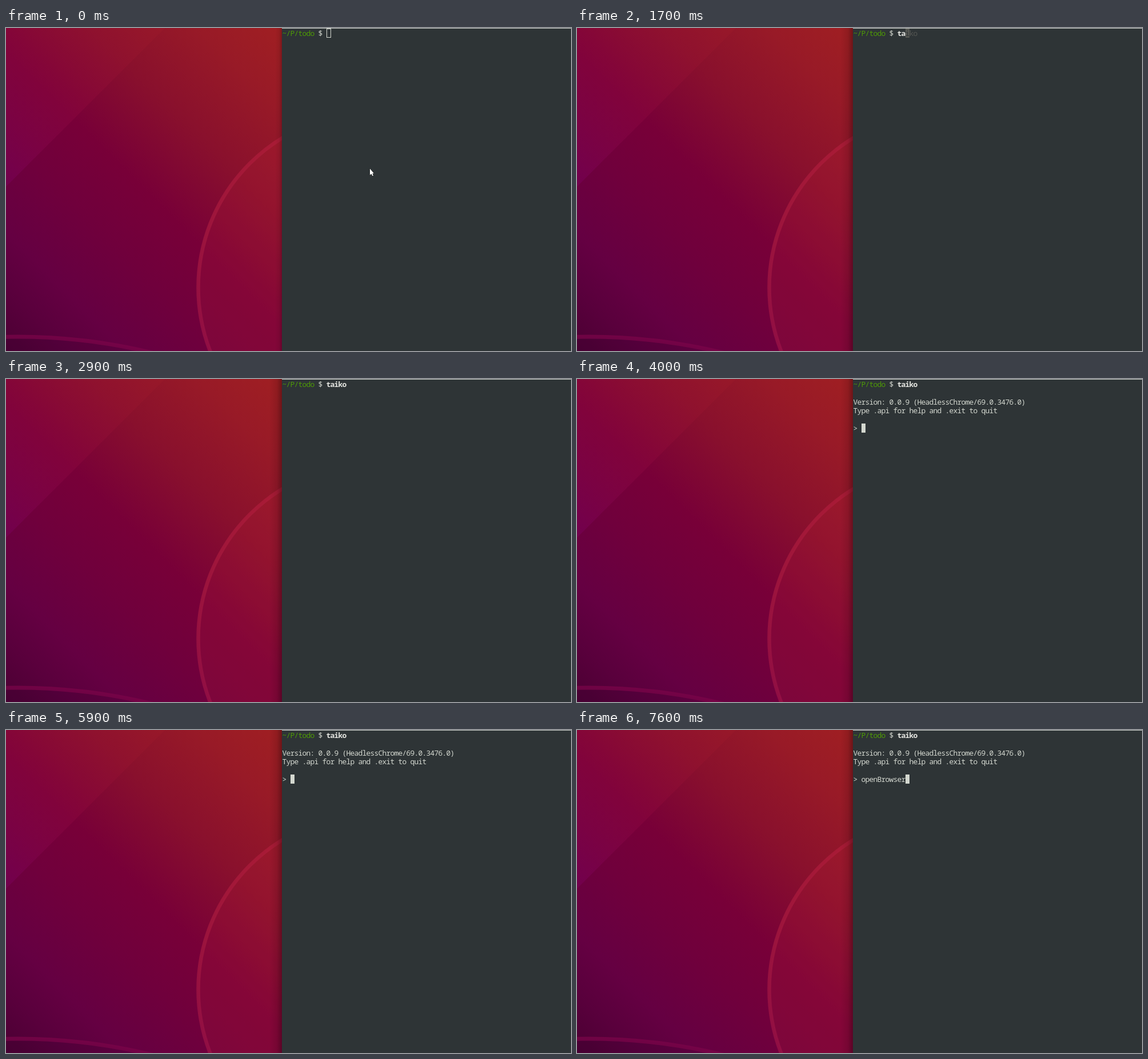
Animation, 989 px wide and 566 px high, one loop 8000 ms. Source, as an HTML page:

```html
<!DOCTYPE html>
<html lang="en">
<head>
<meta charset="utf-8">
<title>Terminal session</title>
<style>
  html, body { margin: 0; width: 100%; height: 100%; overflow: hidden; background: #2e3436; }
  svg { display: block; width: 989px; height: 566px; }
  text {
    font: 13px "Noto Sans Mono", "DejaVu Sans Mono", monospace;
    letter-spacing: -0.8px;
    white-space: pre;
    fill: #d3d7cf;
  }
  .path { fill: #4e9a06; }
  .cmd { font-weight: 700; fill: #e6e7e2; }
  .hint { fill: #555753; }
  .under { fill: #2e3436; }
</style>
</head>
<body>
<svg viewBox="0 0 989 566" xmlns="http://www.w3.org/2000/svg">
  <defs>
    <linearGradient id="wall" gradientUnits="userSpaceOnUse" x1="483" y1="0" x2="-41.5" y2="524.5">
      <stop offset="0" stop-color="#a01f22"/>
      <stop offset=".14" stop-color="#981a27"/>
      <stop offset=".32" stop-color="#89102d"/>
      <stop offset=".5" stop-color="#780038"/>
      <stop offset=".64" stop-color="#70003c"/>
      <stop offset=".8" stop-color="#650042"/>
      <stop offset=".9" stop-color="#59003c"/>
      <stop offset="1" stop-color="#4b0033"/>
    </linearGradient>
    <linearGradient id="fold" gradientUnits="userSpaceOnUse" x1="278" y1="0" x2="0" y2="278">
      <stop offset="0" stop-color="#a81e28" stop-opacity=".2"/>
      <stop offset=".5" stop-color="#9c0c40" stop-opacity=".26"/>
      <stop offset="1" stop-color="#78005c" stop-opacity=".5"/>
    </linearGradient>
    <linearGradient id="ring" gradientUnits="userSpaceOnUse" x1="0" y1="187" x2="0" y2="566">
      <stop offset="0" stop-color="#ac1c37"/>
      <stop offset=".45" stop-color="#a0163e"/>
      <stop offset="1" stop-color="#951045"/>
    </linearGradient>
    <linearGradient id="shade">
      <stop offset="0" stop-color="#000" stop-opacity="0"/>
      <stop offset=".6" stop-color="#000" stop-opacity=".1"/>
      <stop offset="1" stop-color="#000" stop-opacity=".32"/>
    </linearGradient>
    <clipPath id="desk"><rect width="483" height="566"/></clipPath>
  </defs>

  <g clip-path="url(#desk)">
    <rect width="483" height="566" fill="url(#wall)"/>
    <path d="M0 0H278L0 278Z" fill="url(#fold)"/>
    <circle cx="644" cy="455" r="308" fill="#c02838" fill-opacity=".17"/>
    <circle cx="644" cy="455" r="307.5" fill="none" stroke="url(#ring)" stroke-width="6.5" stroke-opacity=".85"/>
    <circle cx="20" cy="1541" r="1000" fill="#200028" fill-opacity=".12" stroke="#7a0548" stroke-width="7" stroke-opacity=".75"/>
    <rect id="shadow" y="0" height="566" fill="url(#shade)"/>
  </g>

  <rect x="483" width="506" height="566" fill="#2e3436"/>
  <rect x="483" width="506" height="1" fill="#c6cac5"/>
  <rect id="cursor"/>
  <g id="screen"></g>
  <path id="arrow" d="M637 246.5V257.8L639.6 255.4L641.3 259.3L643 258.5L641.4 254.8H644Z"
        fill="#fff" stroke="#111" stroke-width=".8" paint-order="stroke"/>
  <path id="beam" d="M636 243.5H640M638 243.5V252.5M636 252.5H640" fill="none" stroke="#d9dbd7" stroke-width="1"/>
</svg>
<script>
const LOOP = 8000, LEFT = 484, COL = 7, ROW = 15.4, PROMPT = 11;
const LIGHT = '#d3d7cf', DIM = '#555753';
const COMMAND = 'taiko', CALL = 'openBrowser';
const $ = id => document.getElementById(id);
const cursor = $('cursor'), screen = $('screen');

// [start time, number of letters]
const commandKeys = [[0, 0], [1500, 1], [1700, 2], [1900, 3], [2000, 5]];
const callKeys = [[0, 0], [7200, 1], [7300, 2], [7600, 11]];
// hidden spans of the blinking cursor
const hidden = [[2900, 3800], [4200, 4700], [5300, 5900], [7000, 7200]];

const latest = (keys, t) => keys.filter(k => k[0] <= t).pop()[1];
const show = (el, on) => el.setAttribute('visibility', on ? 'visible' : 'hidden');
const set = (el, attrs) => {
  for (const name in attrs) el.setAttribute(name, attrs[name]);
};

function line(row, col, str, cls = '') {
  const x = LEFT + col * COL - 0.4, y = 14 + row * ROW;
  return `<text x="${x}" y="${y.toFixed(1)}" class="${cls}">${str}</text>`;
}

function placeCursor(row, col, color, hollow) {
  const inset = hollow ? 0.5 : 0;
  set(cursor, {
    x: LEFT + col * COL + inset,
    y: 1 + Math.round(row * ROW) + inset,
    width: hollow ? 7 : COL,
    height: 16 - 2 * inset,
    fill: hollow ? 'none' : color,
    stroke: hollow ? color : 'none'
  });
}

let drawn = '';
function render(t) {
  const focused = t >= 500, entered = t >= 2500, ready = t >= 4000;
  const typed = latest(commandKeys, t), called = latest(callKeys, t);
  const hinting = typed > 0 && typed < COMMAND.length;

  let html = line(0, 0, '~/P/todo', 'path') + line(0, 9, '$') +
    line(0, PROMPT, COMMAND.slice(0, typed), 'cmd');
  if (hinting) {
    html += line(0, PROMPT + typed, COMMAND[typed], 'under') +
      line(0, PROMPT + typed + 1, COMMAND.slice(typed + 1), 'hint');
  }
  if (ready) {
    html += line(2, 0, 'Version: 0.0.9 (HeadlessChrome/69.0.3476.0)') +
      line(3, 0, 'Type .api for help and .exit to quit') +
      line(5, 0, '&gt; ' + CALL.slice(0, called));
  }
  if (html !== drawn) screen.innerHTML = drawn = html;

  if (ready) placeCursor(5, 2 + called, LIGHT);
  else if (entered) placeCursor(1, 0, LIGHT);
  else placeCursor(0, PROMPT + typed, hinting ? DIM : LIGHT, !focused);
  show(cursor, !hidden.some(([from, to]) => t >= from && t < to));

  show($('arrow'), !focused);
  show($('beam'), focused && t < 1300);
  const spread = focused ? 22 : 12;
  set($('shadow'), { x: 483 - spread, width: spread, opacity: focused ? 1 : 0.7 });
}

const start = performance.now();
function tick() {
  render((performance.now() - start) % LOOP);
  requestAnimationFrame(tick);
}
tick();
</script>
</body>
</html>
```
